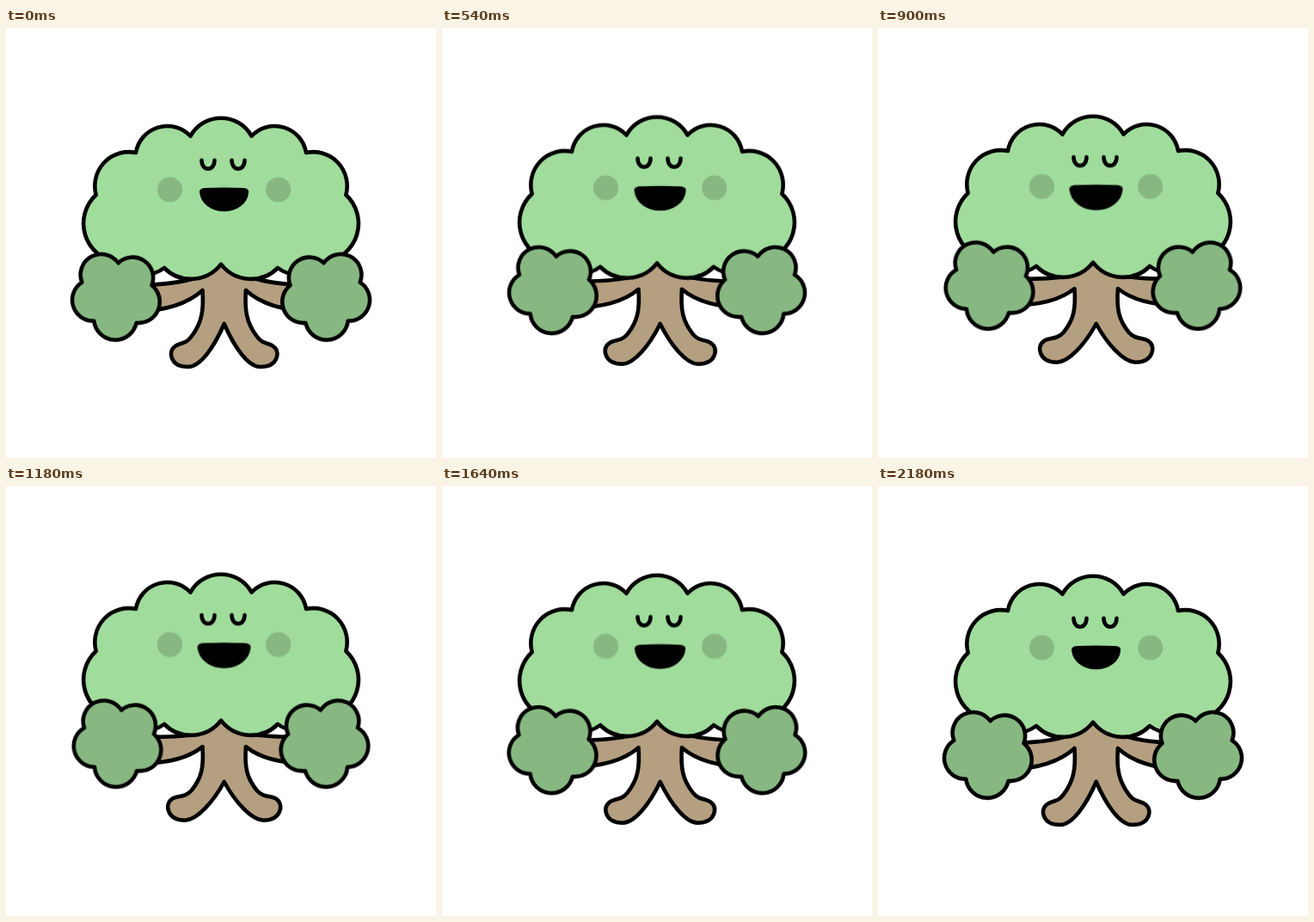
Recreate the animation shown at these times as an HTML page. Size 500x500 px, loop 2.2 s.

```html
<!DOCTYPE html>
<html lang="en">
<head>
<meta charset="utf-8">
<title>Cheering tree</title>
<style>
  html, body { margin: 0; width: 100%; height: 100%; overflow: hidden; background: #fff; }
  svg { display: block; width: 100%; height: 100%; }

  .line { stroke: #000; stroke-width: 4.6; stroke-linejoin: round; stroke-linecap: round; }
  .leaf { fill: #a0dc9c; }
  .dark { fill: #87b882; }
  .wood { fill: #b59f81; }

  /* Sine swing, slightly ahead of the loop start */
  .sway {
    animation: 1100ms cubic-bezier(.364, 0, .636, 1) -65ms infinite alternate both;
  }
  .crown { animation-name: crown; }
  .face { animation-name: face; }
  .mouth { animation-name: mouth; transform-origin: 253.6px 199.5px; }
  .half { animation-name: half; }
  .pom {
    animation-name: pom;
    transform-origin: 128px 314px;
    d: path("M88.3 295.9A24.1 24.1 0 0 1 130.5 273.3A24 24 0 0 1 169.5 299.3A24.6 24.6 0 0 1 151.6 343A25 25 0 0 1 102.3 340.7A24.3 24.3 0 0 1 88.3 295.9Z");
  }

  @keyframes crown { to { transform: translateY(-2.2px); } }
  @keyframes face { to { transform: translateY(-3.8px); } }
  @keyframes mouth { to { transform: translateY(1.2px) scale(1.09, 1.08); } }
  @keyframes pom { to { transform: translate(1.9px, -13.4px) rotate(2.7deg); } }
  @keyframes half {
    from {
      d: path("M256 270L222 290C205 296 180 299 150 299L150 330C183 329 211 321 228.5 305C230 328 228 343 215.5 359C211 365 207 366 202 367.5C194 370 190 376 193 384C196 392 203 394 212 394C226 394 242 371 253.7 344");
    }
    to {
      d: path("M256 270L222 288C205 292 180 292 150 291L150 322C183 323 211 317 228.5 303C230 326 228 339 215.5 354C211 359 206 360 199 361.3C190 363 186 370 189 378C192 386 199 388.5 208 388.5C222 388 241 367 253.7 344");
    }
  }
</style>
</head>
<body>
<svg viewBox="0 0 500 500">
  <path class="half sway wood line"/>
  <g transform="translate(507.4) scale(-1 1)">
    <path class="half sway wood line"/>
  </g>

  <path class="crown sway leaf line" d="M104.7 194
    A39.5 39.5 0 0 1 151 145 A37 37 0 0 1 214.5 125.7
    A40.5 40.5 0 0 1 285.5 125.7 A37 37 0 0 1 349 145
    A39.5 39.5 0 0 1 395.3 194 A45.3 45.3 0 0 1 372 272
    A41 41 0 0 1 316 279 A44 44 0 0 1 250 274.7
    A44 44 0 0 1 184 279 A41 41 0 0 1 128 272
    A45.3 45.3 0 0 1 104.7 194Z"/>

  <g class="face sway">
    <circle class="dark" cx="190.5" cy="188" r="14.6"/>
    <circle class="dark" cx="316.7" cy="188" r="14.6"/>
    <path class="line" fill="none" d="M227.5 153.8C227.5 167 242.5 167 242.5 153.8M262.5 153.8C262.5 167 277.5 167 277.5 153.8"/>
    <path class="mouth sway line" d="M227.3 190.5Q227.6 188.7 231 188.4Q253.6 187.4 276 188.4Q279.8 188.7 279.8 190.5C279 203 267 211 253.6 211C240 211 228.5 203 227.3 190.5Z"/>
  </g>

  <path class="pom sway dark line"/>
  <g transform="translate(500) scale(-1 1)">
    <path class="pom sway dark line"/>
  </g>
</svg>
</body>
</html>
```
